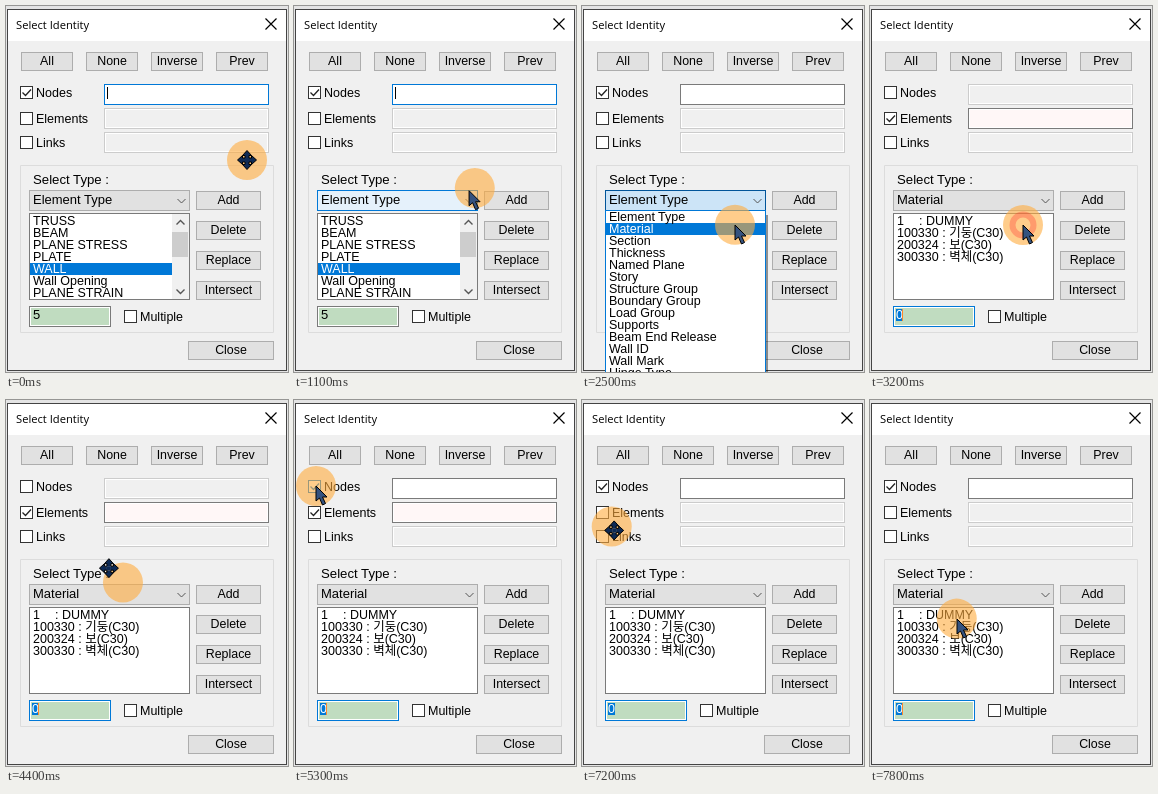
An HTML page for the animation above (8000 ms loop, 282 by 366 pixels).

```html
<!DOCTYPE html>
<html lang="en">
<head>
<meta charset="utf-8">
<title>Select Identity</title>
<style>
html, body { margin: 0; width: 100%; height: 100%; overflow: hidden; background: #f0f0f0; }
svg { display: block; width: 282px; height: 366px; }
text { font-family: "Liberation Sans", "Noto Sans CJK KR", "Noto Sans CJK", sans-serif; white-space: pre; }
.title { font-family: "Open Sans", sans-serif; }
</style>
</head>
<body>
<svg id="stage" viewBox="0 0 282 366"></svg>
<script>
const LOOP = 8000, STEP = 100, LAG = 28;
const BLUE = '#0078d7', GRAY = '#7a7a7a', FACE = '#f0f0f0';
const TYPES = ['Element Type', 'Material', 'Section', 'Thickness', 'Named Plane', 'Story',
  'Structure Group', 'Boundary Group', 'Load Group', 'Supports', 'Beam End Release',
  'Wall ID', 'Wall Mark', 'Hinge Type'];
const ELEMENTS = ['TRUSS', 'BEAM', 'PLANE STRESS', 'PLATE', 'WALL', 'Wall Opening', 'PLANE STRAIN'];
const MATERIALS = ['1', '100330 : 기둥(C30)', '200324 : 보(C30)', '300330 : 벽체(C30)'];

const smooth = u => u * u * (3 - 2 * u);
const easeOut = u => 1 - (1 - u) ** 3;
const START = [241, 154];
const MOVES = [ // start, duration, target, easing
  [700, 600, [152, 195.5], smooth],
  [2000, 500, [153, 219], smooth],
  [4311, 600, [22, 86], easeOut],
  [5700, 400, [22, 114], smooth],
  [7000, 800, [87, 219], smooth],
];
const CLICKS = [1300, 3000, 5000, 6300];
const RING = [[11, .3], [22, .55], [10.5, .3]]; // radius, opacity per step

function pointer(t) {
  let p = START;
  for (const [t0, len, to, ease] of MOVES) {
    if (t <= t0) break;
    const k = ease(Math.min(1, (t - t0) / len));
    p = p.map((v, i) => v + (to[i] - v) * k);
  }
  return p;
}

const within = (t, a, b) => t >= a && t < b;
const inside = ([x, y], l, top, r, b) => within(x, l, r) && within(y, top, b);
const blink = (t, t0) => Math.floor((t - t0) / 500) % 2 === 0;

const fill = (x, y, w, h, c) =>
  `<rect x="${x}" y="${y}" width="${w}" height="${h}" fill="${c}" shape-rendering="crispEdges"/>`;
const box = (l, t, r, b, c, edge) => fill(l, t, r - l, b - t, edge) + fill(l + 1, t + 1, r - l - 2, b - t - 2, c);
const edit = (l, t, r, b, c, edge) => box(l, t, r, b, '#fff', edge) + fill(l + 2, t + 2, r - l - 4, b - t - 4, c);
const line = (d, c = '#000', w = 1) => `<path d="${d}" fill="none" stroke="${c}" stroke-width="${w}"/>`;
const text = (x, mid, s, c = '#000', size = 12.5, extra = '') =>
  `<text x="${x}" y="${mid + 4.5}" fill="${c}" font-size="${size}" ${extra}>${s}</text>`;
const button = (l, t, r, b, s) =>
  box(l, t, r, b, '#e1e1e1', '#adadad') + text((l + r) / 2, (t + b) / 2 - 1, s, '#000', 12.4, 'text-anchor="middle"');
const check = (x, y, s, on, hot) =>
  box(x, y, x + 13, y + 13, '#fff', hot ? BLUE : '#333') +
  (on ? line(`M${x + 2.5} ${y + 6.5}l3 3 5.5 -6`, hot ? BLUE : '#222', 1.3) : '') + text(x + 16, y + 6.5, s);
const field = (y, on, focus, tint = '#fff') =>
  edit(98, y, 263, y + 21, on ? tint : FACE, focus ? BLUE : on ? GRAY : '#ccc');

function frame() {
  return fill(0, 0, 282, 366, '#e4e4e4') + box(1, 3, 281, 365, FACE, '#444') + fill(2, 4, 278, 31, '#fff') +
    text(10, 18, 'Select Identity', '#000', 11.2, 'class="title"') + line('M259.5 12.5l11 11m0 -11l-11 11', '#000', 1.2) +
    ['All', 'None', 'Inverse', 'Prev'].map((s, i) => button(15 + 65 * i, 46, 67 + 65 * i, 65, s)).join('') +
    line('M14.5 159.5h253v167h-253z', '#dcdcdc') + text(27, 173.5, 'Select Type :', '#000', 13.2) +
    ['Add', 'Delete', 'Replace', 'Intersect'].map((s, i) => button(190, 185 + 30 * i, 255, 204 + 30 * i, s)).join('') +
    button(182, 335, 268, 354, 'Close') + check(118, 304, 'Multiple');
}

function listBox(material) {
  const rows = material ? MATERIALS : ELEMENTS;
  let s = box(23, 207, 184, 294, '#fff', GRAY);
  if (!material) {
    s += fill(24, 257, 142, 12, BLUE) + fill(166, 208, 17, 85, FACE) + fill(166, 226, 16, 25, '#cdcdcd') +
      line('M170.5 218.5l4 -4 4 4M170.5 283.5l4 4 4 -4', '#555', 1.4);
  } else s += text(49, 214, ': DUMMY');
  return s + rows.map((r, i) => text(27, 214 + 12 * i, r, !material && i === 4 ? '#fff' : '#000')).join('');
}

function dropDown(row) {
  return fill(184, 209, 2, 157, 'rgba(0,0,0,.4)') + box(23, 204, 184, 370, '#fff', BLUE) +
    fill(24, 205 + 12 * row, 159, 12, BLUE) +
    TYPES.map((s, i) => text(27, 210 + 12 * i, s, i === row ? '#fff' : '#000')).join('');
}

function valueBox(material, focus, caret) {
  let s = edit(23, 300, 105, 321, '#c0dcc0', focus ? BLUE : GRAY);
  if (!focus) return s + text(27, 308.5, material ? '0' : '5', '#000', 13);
  s += fill(26, 303, 7, 12, BLUE) + text(26, 308.5, '0', '#fff');
  return caret ? s + fill(32, 303, 1, 12, '#ff8728') : s;
}

function cursor([x, y], arrow) {
  const arm = 'M-2 -2V-4.5H-4.5L0 -9.5 4.5 -4.5H2V-2';
  const shape = arrow
    ? '<path d="M0 0V15L3.5 12 6.5 19 9.5 17.5 6.5 11H11Z"/>'
    : [0, 90, 180, 270].map(a => `<path d="${arm}" transform="rotate(${a})"/>`).join('') +
      '<path d="M-2 -2H2V2H-2Z" stroke="none"/>';
  return `<g transform="translate(${x} ${y})" fill="${arrow ? '#34527f' : '#0e2a55'}" stroke="#000">${shape}</g>`;
}

function scene(t) {
  const p = pointer(t), [hx, hy] = pointer(t - LAG);
  const material = t >= 3100, open = within(t, 1400, 3100);
  const nodes = !within(t, 3100, 5200), elements = within(t, 3100, 6600);
  const nodeFocus = t < 1700;
  const valueFocus = material && !within(t, 5000, 5300) && !within(t, 6300, 6700);
  const focusTime = t >= 6700 ? 6700 : t >= 5300 ? 5300 : 3000;
  const overCombo = inside(p, 23, 184, 184, 206);
  const overNodes = inside(p, 14, 78, 68, 96), overElements = inside(p, 14, 103, 84, 122);
  const arrow = open || overCombo || overNodes || overElements || inside(p, 23, 207, 184, 294);

  let s = frame() + check(14, 80, 'Nodes', nodes, overNodes) +
    check(14, 106, 'Elements', elements, overElements) + check(14, 130, 'Links') +
    field(78, nodes, nodeFocus) + field(102, elements, false, '#fff7f7') + field(126);
  if (nodeFocus && (t < 400 || within(t, 900, 1400))) s += fill(101, 81, 1, 12, '#000');

  s += box(23, 184, 184, 205, open ? '#cce4f7' : overCombo ? '#e5f1fb' : '#e1e1e1',
      open ? '#005499' : overCombo ? BLUE : '#adadad') +
    text(27, 193, material ? 'Material' : 'Element Type', '#000', 13) +
    line('M171.5 193l4 4 4 -4', '#555') +
    listBox(material) + valueBox(material, valueFocus, blink(t, focusTime));
  if (open) s += dropDown(p[1] >= 217 ? 1 : 0);

  s += `<circle cx="${hx}" cy="${hy}" r="20" fill="#ffac3e" fill-opacity=".6"/>`;
  for (const c of CLICKS) {
    const [r, alpha] = RING[(t - c) / STEP] || [];
    if (r) s += `<circle cx="${hx}" cy="${hy}" r="${r}" fill="none" stroke="#ff2828" stroke-opacity="${alpha}" stroke-width="6"/>`;
  }
  return s + cursor(p, arrow);
}

const stage = document.getElementById('stage');
const began = performance.now();
let shown = -1;
function draw() {
  const t = Math.floor((performance.now() - began) % LOOP / STEP) * STEP;
  if (t !== shown) stage.innerHTML = scene(shown = t);
  requestAnimationFrame(draw);
}
draw();
</script>
</body>
</html>
```
